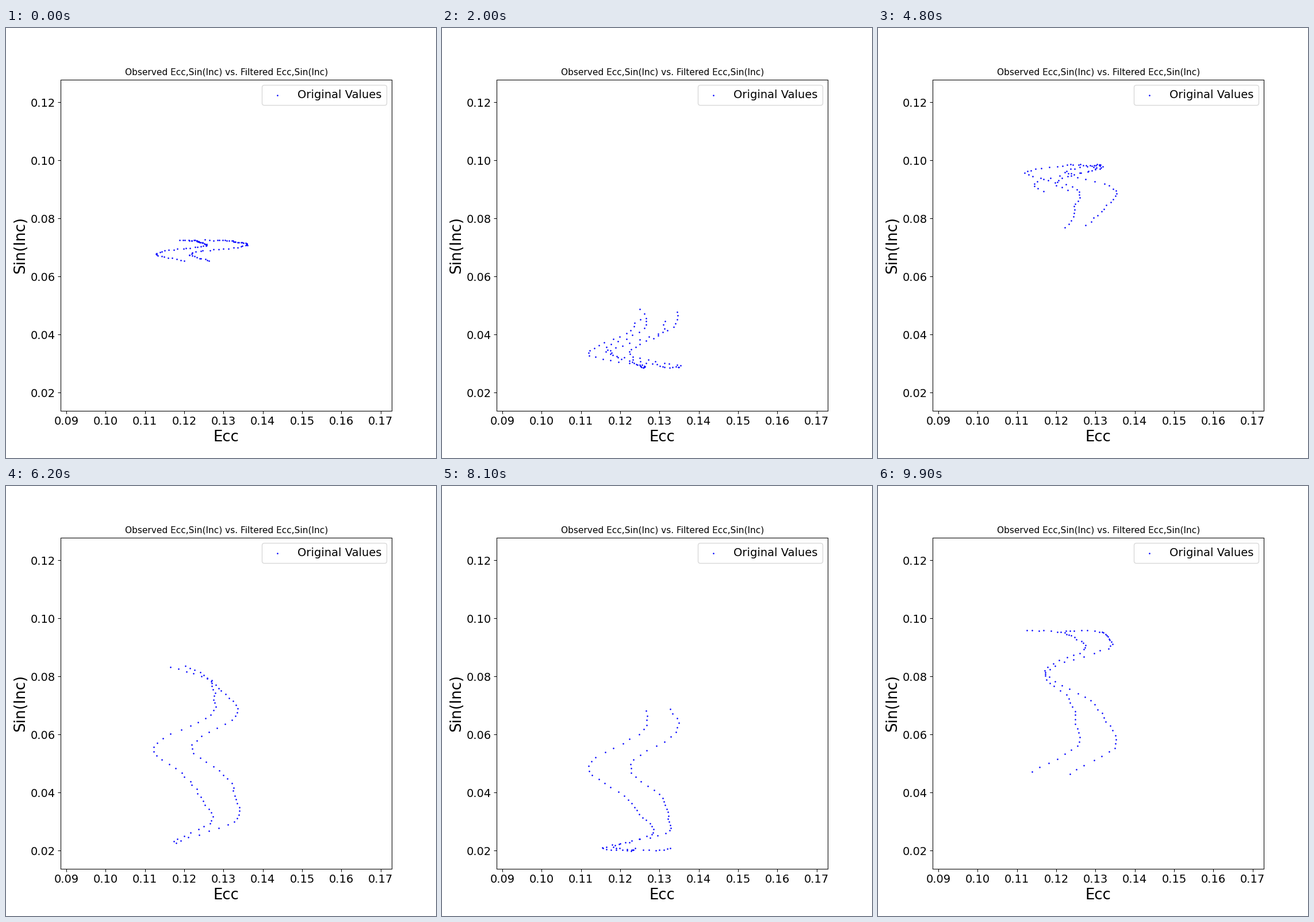
Write a matplotlib script that moves like this. It is 748x748 px and loops after 10 s.

```python
import numpy as np
import matplotlib.pyplot as plt
from matplotlib.animation import FuncAnimation

FRAMES = 100
N = 100                     # samples in each window
K = np.arange(N)
SIDE = np.where(K % 2, 1, -1)
TURN = 2.04                 # phase the inclination cycle gains per window
WAVE, SPLIT = 52.14, 89.0   # periods of the eccentricity terms, in samples

# Slow drift of the inclination cycle: window, lowest, highest, start phase.
DRIFT = np.array([
    (0, 0.0467, 0.0725, 0.00),
    (1, 0.0190, 0.1000, 2.04),
    (20, 0.0287, 0.1060, 39.78),
    (30, 0.0214, 0.0986, 60.17),
    (48, 0.0347, 0.0985, 99.29),
    (62, 0.0154, 0.0876, 126.14),
    (81, 0.0200, 0.0978, 164.68),
    (99, 0.0224, 0.0958, 200.96),
]).T


def sin_inc(n, pace):
    low, high, start = (np.interp(n, DRIFT[0], row) for row in DRIFT[1:])
    theta = start + TURN * pace * K / N
    return (low + high) / 2 + (high - low) / 2 * np.cos(theta)


def ecc(t):
    """A skewed wave, on which even and odd samples form two branches."""
    phi = 2 * np.pi * (t - 9900) / WAVE + np.pi
    wave = (0.0062 * np.cos(phi) - 0.0013 * np.cos(2 * phi)
            + 0.0012 * np.sin(2 * phi))
    split = 0.0052 * np.cos(np.pi * (t - 27) / SPLIT)
    return 0.1249 + wave + SIDE * split


def window(n):
    rng = np.random.default_rng(n)
    pace = min(1, 0.55 + n)     # sampling starts out finer
    x = ecc(n * N + pace * K) + rng.normal(0, 0.0002, N)
    y = sin_inc(n, pace) + rng.normal(0, 0.0001, N)
    return np.column_stack((x, y))


fig, ax = plt.subplots(figsize=(8, 8), dpi=93.5)
ax.set_box_aspect(1)
dots = ax.scatter(*window(0).T, s=1, color="blue", label="Original Values")
ax.set_xlim(0.0886, 0.17285)
ax.set_ylim(0.01372, 0.12778)
ax.set_xticks(np.arange(9, 18) / 100)
ax.set_yticks(np.arange(2, 13, 2) / 100)
ax.tick_params(labelsize=15)
ax.set_title("Observed Ecc,Sin(Inc) vs. Filtered Ecc,Sin(Inc)", fontsize=11.87)
ax.set_xlabel("Ecc", fontsize=20)
ax.set_ylabel("Sin(Inc)", fontsize=20)
ax.legend(loc="upper right", fontsize=15)


def update(n):
    dots.set_offsets(window(n))
    return (dots,)


anim = FuncAnimation(fig, update, frames=FRAMES, interval=100,
                     repeat=True, repeat_delay=0)
plt.show()
```
